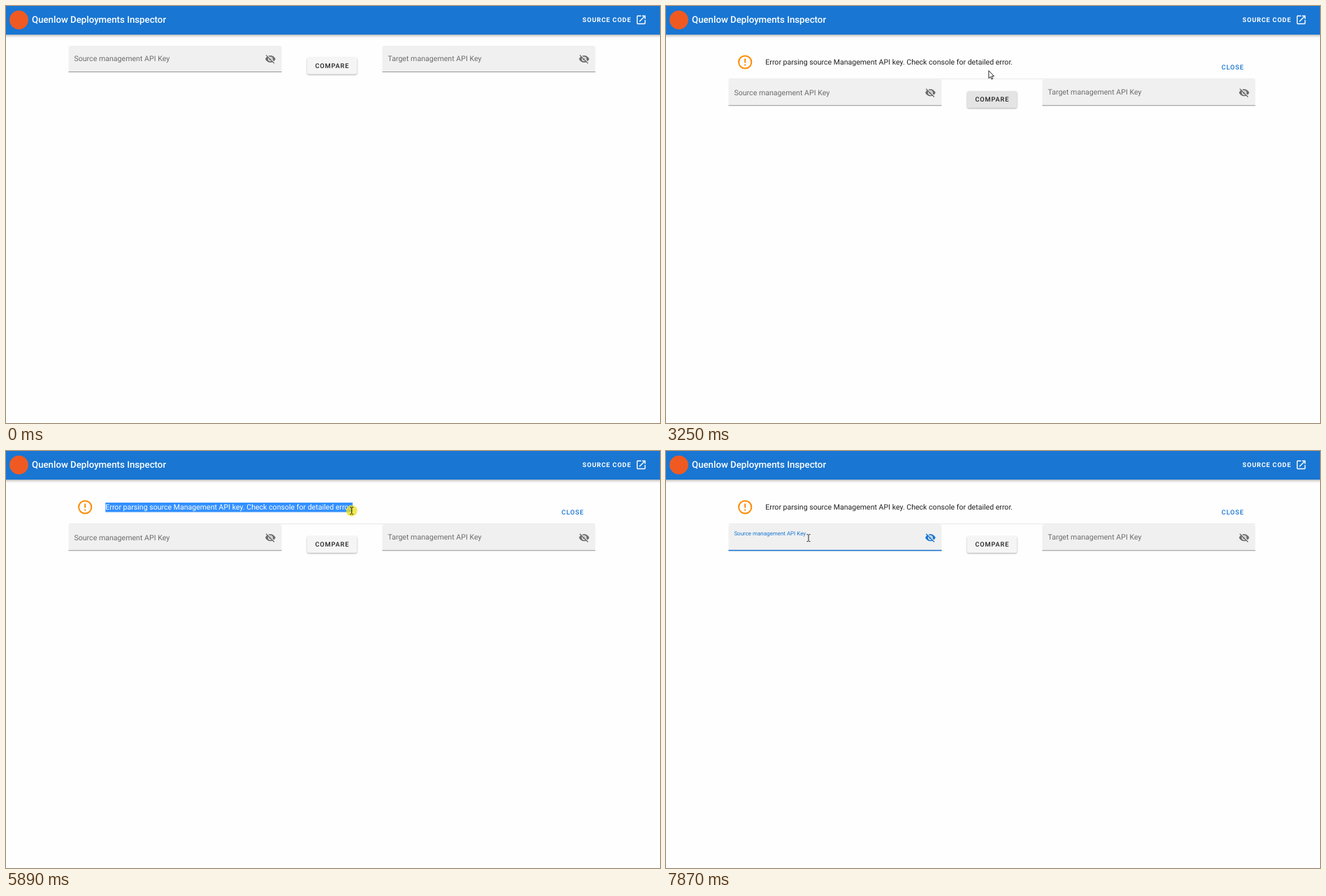
An HTML page that plays this animation: 936 px wide and 598 px high, repeating every 8 s.

```html
<!DOCTYPE html>
<html lang="en">
<head>
<meta charset="utf-8">
<title>Deployments Inspector</title>
<style>
  html, body { margin: 0; width: 100%; height: 100%; overflow: hidden; background: #fefefe; }
  svg { display: block; width: 936px; height: 598px; }
  text { font-family: Roboto, sans-serif; text-rendering: geometricPrecision; white-space: pre; }
  .caps { font-size: 9.3px; font-weight: 500; letter-spacing: .0892em; }
  .label { font-size: 10.62px; fill: #6c6c6c; }
  .message { font-size: 10.57px; fill: #222; }
  .bar { filter: drop-shadow(0 1px 2px rgba(0,0,0,.4)); }
  .raised { filter: drop-shadow(0 1px 1px rgba(0,0,0,.32)); }
</style>
</head>
<body>
<svg viewBox="0 0 936 598">
  <defs>
    <mask id="slashGap">
      <rect width="24" height="24" fill="#fff"/>
      <path d="M2 .7L23 21.7" stroke="#000" stroke-width="2"/>
    </mask>
    <g id="eyeOff">
      <path mask="url(#slashGap)" fill-rule="evenodd" d="M1 12C2.7 7.6 7 4.5 12 4.5S21.3 7.6 23 12C21.3 16.4 17 19.5 12 19.5S2.7 16.4 1 12ZM12 7a5 5 0 1 0 0 10a5 5 0 1 0 0-10ZM12 9a3 3 0 1 1 0 6a3 3 0 1 1 0-6Z"/>
      <path d="M2 4.3L3.3 3L21 20.7L19.7 22Z"/>
    </g>
    <clipPath id="bannerClip"><rect id="bannerArea" x="89" y="57" width="755" height="0"/></clipPath>
    <clipPath id="buttonClip"><rect x="431" y="73.7" width="71.3" height="24" rx="2.7"/></clipPath>
  </defs>

  <rect width="936" height="598" fill="#fefefe"/>
  <rect class="bar" x="-8" y="-8" width="952" height="49" fill="#1976d2"/>
  <circle cx="18.5" cy="20" r="13.4" fill="#f05a22"/>
  <text x="37" y="24.4" font-size="13.25" font-weight="500" fill="#fff">Quenlow Deployments Inspector</text>
  <text class="caps" x="825" y="23.3" fill="#fff" style="font-weight:700;font-size:9.2px">SOURCE CODE</text>
  <path transform="translate(900.6 11.5) scale(.7)" fill="#fff" d="M14 3V5H17.6L7.8 14.8L9.2 16.2L19 6.4V10H21V3M19 19H5V5H12V3H5A2 2 0 0 0 3 5V19A2 2 0 0 0 5 21H19A2 2 0 0 0 21 19V12H19Z"/>

  <g clip-path="url(#bannerClip)">
    <circle cx="113.2" cy="80.5" r="9.1" fill="none" stroke="#fb8c00" stroke-width="2"/>
    <path d="M113.2 75.4V81.6M113.2 83.5V85.5" stroke="#fb8c00" stroke-width="2"/>
    <rect id="selection" x="142.3" y="74" width="0" height="13.6" fill="#3390ff"/>
    <text class="message" id="message" x="142.3" y="84.2"><tspan id="picked" fill="#fff"></tspan><tspan id="rest">Error parsing source Management API key. Check console for detailed error.</tspan></text>
    <text class="caps" x="795" y="90.9" fill="#1976d2">CLOSE</text>
    <rect x="89.5" y="104.4" width="754" height=".8" fill="#dedede"/>
  </g>

  <g id="form">
    <path id="sourceBox" d="M89.5 94.7V60a3 3 0 0 1 3-3H391.5a3 3 0 0 1 3 3V94.7Z"/>
    <rect id="sourceLine" x="89.5" y="94" width="305" height=".9"/>
    <rect id="focusLine" y="93.5" height="1.5" fill="#1976d2"/>
    <text class="label" id="sourceLabel">Source management API Key</text>
    <rect id="caret" x="97.4" y="76" width=".9" height="12" fill="#1976d2"/>
    <use id="sourceEye" href="#eyeOff" transform="translate(370.4 68) scale(.667)"/>

    <path fill="#f0f0f0" d="M538.5 94.7V60a3 3 0 0 1 3-3H840.5a3 3 0 0 1 3 3V94.7Z"/>
    <rect x="538.5" y="94" width="305" height=".9" fill="#8c8c8c"/>
    <text class="label" x="546.4" y="79.2">Target management API Key</text>
    <use href="#eyeOff" transform="translate(819.4 68) scale(.667)" fill="#6c6c6c"/>

    <rect class="raised" id="button" x="431" y="73.7" width="71.3" height="24" rx="2.7"/>
    <g clip-path="url(#buttonClip)"><circle id="ripple" cx="461.5" cy="89"/></g>
    <text class="caps" x="442.4" y="89" fill="#222">COMPARE</text>
  </g>

  <circle id="press" r="8" fill="#eee11e" fill-opacity=".77"/>
  <g id="pointer">
    <path id="arrow" d="M.4 .4V11.4L2.9 9.1L4.5 12.7L6.2 12L4.6 8.4H8Z" fill="#fff" stroke="#111" stroke-width=".9"/>
    <path id="hand" d="M-1.2 1A1.2 1.2 0 0 1 1.2 1V5.6Q2.3 4.6 3.3 5.7Q4.5 5 5.3 6.2Q6.7 5.8 7 7.4V10Q6.9 12 5.8 13V15H-.8V13.5Q-3 11 -4.3 8.6Q-3.6 7 -1.2 9Z" fill="#fff" stroke="#111" stroke-width=".9"/>
    <path id="beam" d="M-2.5-5H-.7M.7-5H2.5M0-4.8V4.8M-2.5 5H-.7M.7 5H2.5" fill="none" stroke="#222" stroke-width="1"/>
  </g>
</svg>
<script>
const LOOP = 8000;
const $ = id => document.getElementById(id);
const set = (id, attrs) => { for (const k in attrs) $(id).setAttribute(k, attrs[k]); };
const show = (id, on) => set(id, { visibility: on ? 'visible' : 'hidden' });
const mix = (a, b, p) => a + (b - a) * p;
const linear = p => p;
const out = p => 1 - (1 - p) ** 2;
const soft = p => p * p * (3 - 2 * p);

// Pointer strokes: start, end, number of poses, from, to, easing
const strokes = [
  [520, 1050, 6, [818, 556], [551, 372], out],
  [1380, 2160, 8, [510.5, 302.5], [465, 99], out],
  [2490, 2930, 5, [464, 97], [461.5, 92.3], out],
  [3470, 4240, 8, [458, 91], [145, 80.5], soft],
  [4340, 5120, 8, [143, 80.5], [344, 80.5], linear],
  [5240, 6010, 8, [368, 81.5], [506, 86], p => mix(p, out(p), .5)],
  [6110, 6770, 7, [502, 87], [231.7, 114.7], soft],
  [6890, 7330, 5, [218, 119], [204, 124.7], out]
];

// Value of the last [time, value] step already reached
const stepAt = (steps, t) => steps.reduce((v, s) => t >= s[0] ? s[1] : v, 0);
const bannerSteps = [[3030, 14], [3140, 41], [3250, 48.3]];
const labelSteps = [[7440, .45], [7550, 1]];
const lineSteps = [[7440, .3], [7550, .86], [7770, 1]];
const rippleSteps = [[2930, 11], [3030, 32], [3140, 60], [3250, 0]];

const text = $('rest').textContent;
const edges = [...text].map((_, i) => $('message').getSubStringLength(0, i + 1));

function pointerAt(t) {
  const stroke = strokes.filter(s => t >= s[0]).pop();
  if (!stroke) return null;
  const [start, end, poses, from, to, ease] = stroke;
  const last = poses - 1;
  const pose = Math.min(last, Math.floor((t - start) / (end - start) * last + .1));
  return from.map((v, i) => mix(v, to[i], ease(pose / last)));
}

function drawPointer(t, at) {
  show('pointer', at);
  const [x, y] = at || [0, 0];
  const dragging = t >= 4340 && t < 6110;
  const onButton = t >= 2490 && t < 3140;
  const onText = t >= 3250 && x > 141 && x < 500 && y < 89;
  const onField = t >= 6110 && x < 394 && y > 105;
  const kind = onButton ? 'hand' : dragging || onText || onField ? 'beam' : 'arrow';
  for (const id of ['arrow', 'hand', 'beam']) set(id, { display: id === kind ? 'inline' : 'none' });
  set('pointer', { transform: `translate(${x} ${y})` });
  set('press', { cx: x, cy: y });
  show('press', dragging || (t >= 2930 && t < 3030) || (t >= 7440 && t < 7550));
  return onField;
}

function drawSelection(t, x) {
  const reach = t < 4340 || t >= 7440 ? -9 : t < 6010 ? x - 142.3 : 999;
  const count = edges.filter(e => e < reach + 2).length;
  $('picked').textContent = text.slice(0, count);
  $('rest').textContent = text.slice(count);
  set('selection', { width: count ? edges[count - 1] : 0 });
}

function drawField(t, hovered) {
  const focused = t >= 7440;
  const lift = stepAt(labelSteps, t);
  const half = 152.5 * stepAt(lineSteps, t);
  const hover = hovered && !focused;
  const tint = focused ? '#1976d2' : '#6c6c6c';
  set('sourceBox', { fill: hover ? '#e0e0e0' : '#f0f0f0' });
  set('sourceLine', { fill: hover ? '#3a3a3a' : '#8c8c8c' });
  set('focusLine', { x: 242 - half, width: half * 2 });
  set('sourceLabel', { transform: `translate(97.4 ${mix(79.2, 72.4, lift)}) scale(${mix(1, .75, lift)})` });
  $('sourceLabel').style.fill = tint;
  set('sourceEye', { fill: tint });
  show('caret', focused && t < 7870);
}

function draw(t) {
  const at = pointerAt(t);
  const shift = stepAt(bannerSteps, t);
  set('bannerArea', { height: shift });
  set('form', { transform: `translate(0 ${shift})` });
  set('button', { fill: t < 2490 || t >= 3470 ? '#f5f5f5' : t < 3250 ? '#dfdfdf' : '#e4e4e4' });
  set('ripple', { r: stepAt(rippleSteps, t), 'fill-opacity': t < 3030 ? .12 : .06 });
  drawField(t, drawPointer(t, at));
  drawSelection(t, at ? at[0] : 0);
}

const began = performance.now();
function tick() {
  draw((performance.now() - began) % LOOP);
  requestAnimationFrame(tick);
}
tick();
</script>
</body>
</html>
```
